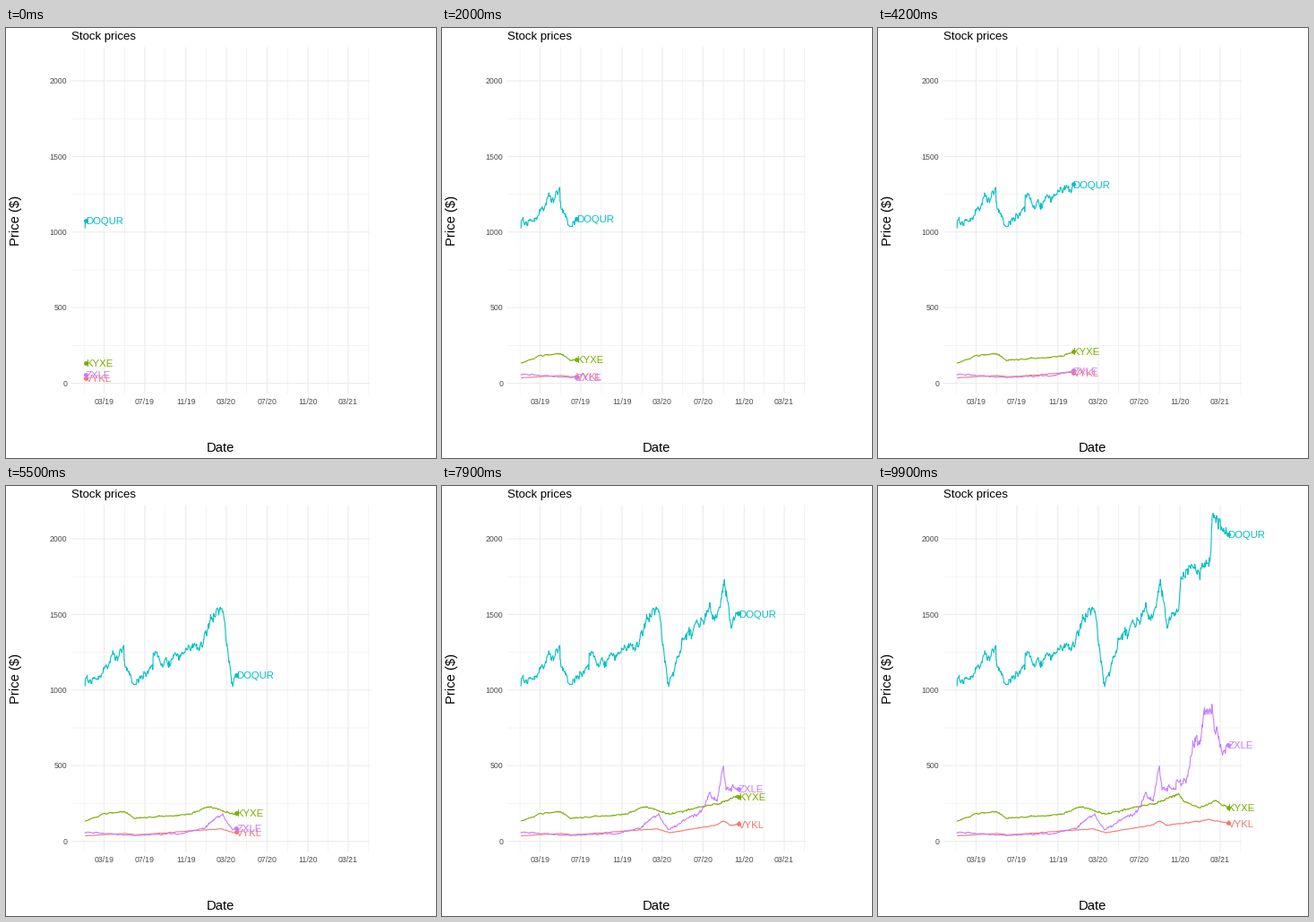
A matplotlib script for the animation above (10 s loop, 480 by 480 pixels).

```python
import matplotlib.pyplot as plt
import numpy as np
from matplotlib.animation import FuncAnimation

SIZE, DPI = 480, 80
PT = 72 / DPI  # points per pixel
FRAMES, INTERVAL = 100, 100
START = np.datetime64("2019-01-03")
LAST_DAY = 811

plt.rcParams.update({"font.family": "Liberation Sans", "path.snap": False})

# label, colour, daily volatility, main (day, price) turns
SERIES = [
    ("VYKL", "#F8766D", 0.011,
     [(0, 36), (120, 53), (151, 43), (405, 82), (445, 56), (586, 109),
      (607, 134), (626, 107), (755, 143), (LAST_DAY, 120)]),
    ("KYXE", "#7CAE00", 0.011,
     [(0, 131), (55, 182), (120, 193), (148, 149), (305, 180), (375, 230),
      (445, 178), (537, 226), (586, 248), (663, 317), (678, 265),
      (725, 223), (774, 270), (LAST_DAY, 222)]),
    ("DOQUR", "#00BFC4", 0.011,
     [(0, 1025), (1, 1078), (26, 1075), (92, 1211), (116, 1296), (117, 1199),
      (151, 1038), (203, 1135), (204, 1245), (232, 1153), (357, 1360),
      (379, 1480), (412, 1524), (438, 1073), (454, 1102), (483, 1345),
      (564, 1550), (586, 1481), (608, 1717), (629, 1409), (664, 1540),
      (671, 1750), (699, 1820), (725, 1774), (757, 1850), (762, 2058),
      (776, 2110), (LAST_DAY, 2032)]),
    ("ZXLE", "#C77CFF", 0.028,
     [(0, 62), (150, 38), (293, 51), (358, 86), (397, 165), (412, 183),
      (441, 75), (540, 200), (564, 320), (586, 275), (606, 498), (614, 340),
      (683, 408), (715, 690), (725, 664), (739, 860), (762, 860),
      (795, 570), (LAST_DAY, 640)]),
]


def to_x(day):
    return 109.5 + (np.asarray(day) - 57) * 0.3728


def to_y(price):
    return 396.6 - np.asarray(price) * 0.1688


def daily(turns, vol, seed):
    """Weekday prices: straight runs between turns plus a pinned noise walk."""
    rng = np.random.default_rng(seed)
    knots, prices = np.array(turns, float).T
    weekdays = [d for d in range(LAST_DAY + 1) if (d + 3) % 7 < 5]
    days = np.union1d(weekdays, knots)
    noise = rng.normal(0, vol, days.size)
    for i in range(1, days.size):
        noise[i] += 0.7 * noise[i - 1]
    noise -= np.interp(days, knots, noise[np.isin(days, knots)])
    return days, np.interp(days, knots, prices) * (1 + noise)


fig = plt.figure(figsize=(SIZE / DPI, SIZE / DPI), dpi=DPI, facecolor="white")
ax = fig.add_axes([0, 0, 1, 1])
ax.set(xlim=(0, SIZE), ylim=(SIZE, 0))
ax.axis("off")


def label(x, y, text, px, color="black", **kw):
    return ax.text(x, y, text, fontsize=px * PT, color=color,
                   va="baseline", **kw)


def grid(xs, ys, width):
    style = dict(color="#EBEBEB", lw=width * PT, zorder=1)
    ax.vlines(xs, 21.4, 408.2, **style)
    ax.hlines(ys, 73, 406, **style)


months = np.arange("2018-11", "2021-08", 4, dtype="datetime64[M]")
month_x = to_x((months.astype("datetime64[D]") - START).astype(int))
prices = np.arange(0, 2001, 500)
grid((month_x[:-1] + month_x[1:]) / 2, to_y(prices[:-1] + 250), 0.53)
grid(month_x[1:-1], to_y(prices), 1.07)

for x, month in zip(month_x[1:-1], months[1:-1].astype(str)):
    label(x, 420, f"{month[5:]}/{month[2:4]}", 8.8, "#4D4D4D", ha="center")
for p in prices:
    label(68.2, to_y(p) + 3.2, str(p), 8.8, "#4D4D4D", ha="right")
label(73, 13, "Stock prices", 13.2)
label(239.5, 473, "Date", 14.8, ha="center")
label(14.5, 215, "Price ($)", 14.8, ha="center", rotation=90,
      rotation_mode="anchor")

tracks = []
for k, (name, color, vol, turns) in enumerate(SERIES):
    days, values = daily(turns, vol, 10 + k)
    line, = ax.plot([], [], color=color, lw=1.07 * PT, zorder=3 + k / 10,
                    solid_capstyle="butt", solid_joinstyle="round")
    dot, = ax.plot([], [], "o", color=color, ms=4.9 * PT, mew=0,
                   zorder=4 + k / 10)
    tag = label(0, 0, name, 11.38, color, zorder=5 + k / 10)
    tracks.append((days, values, line, dot, tag))


def update(i):
    now = min(1.4 + 8.225 * i, LAST_DAY)
    artists = []
    for days, values, line, dot, tag in tracks:
        seen = days < now
        price = np.interp(now, days, values)
        x, y = to_x(now), to_y(price)
        line.set_data(to_x(np.append(days[seen], now)),
                      to_y(np.append(values[seen], price)))
        dot.set_data([x], [y])
        tag.set_position((x, y + 4.3))
        artists += [line, dot, tag]
    return artists


anim = FuncAnimation(fig, update, frames=FRAMES, interval=INTERVAL,
                     repeat=True, repeat_delay=0, blit=False)
plt.show()
```
